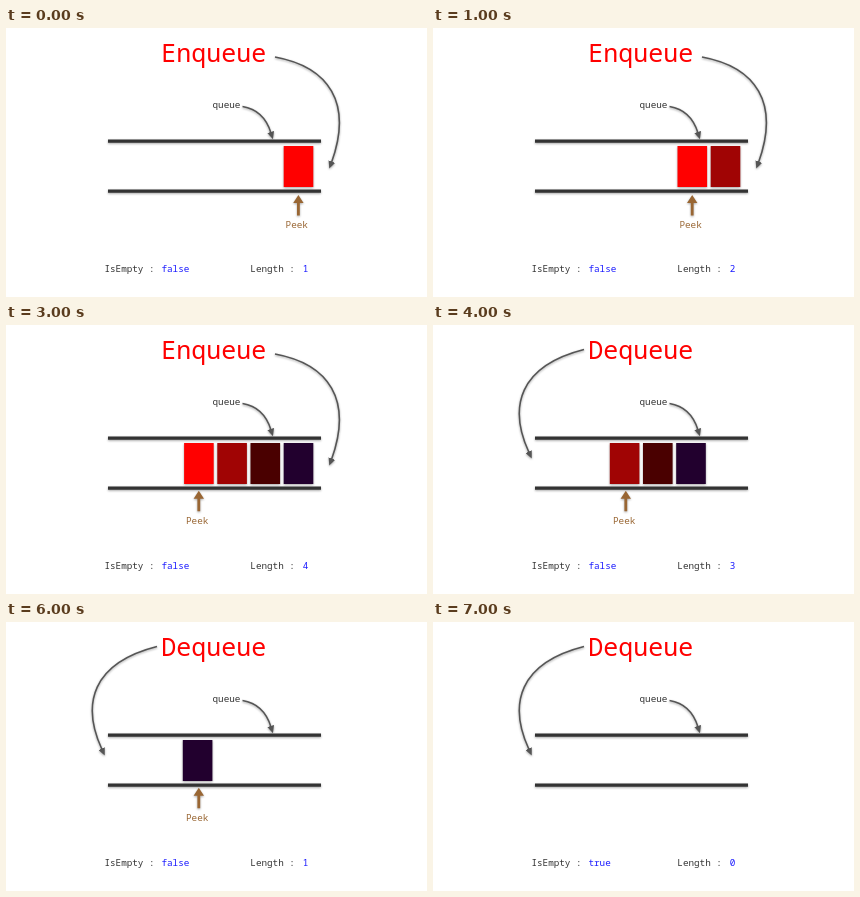
An HTML page that plays this animation: 421 by 269 pixels, repeating every 8000 ms.

```html
<!DOCTYPE html>
<html lang="en">
<head>
<meta charset="utf-8">
<title>Queue: enqueue and dequeue</title>
<style>
  html, body { margin: 0; width: 100%; height: 100%; overflow: hidden; background: #fff; }
  svg { display: block; width: 421px; height: 269px; }
  text { font: 9.3px "Noto Sans Mono", "DejaVu Sans Mono", monospace; fill: #333; white-space: pre; }
  #title { font-size: 25px; fill: #f00; }
  .value { fill: #1a1aff; }
  .rail { stroke: #333; stroke-width: 3.2; }
  .curve { fill: none; stroke: #555; stroke-width: 1.6; marker-end: url(#head); }
  .shadow { filter: drop-shadow(0 1.5px 1px rgba(0, 0, 0, .35)); }
  #peek, #peek text { fill: #996633; }
</style>
</head>
<body>
<svg viewBox="0 0 421 269">
  <defs>
    <marker id="head" markerUnits="userSpaceOnUse" markerWidth="8" markerHeight="7"
            refX="1" refY="3.5" orient="auto">
      <path d="M0 0L7.5 3.5L0 7Z" fill="#555"/>
    </marker>
  </defs>

  <text id="title" x="155.2" y="34.3"></text>
  <text x="206.5" y="79.8">queue</text>
  <g class="shadow">
    <path class="curve" d="M236.5 78.5C252 81 261 92 265 105"/>
    <path class="curve" id="enqueueArrow" d="M269 29C323 39 347 75 325.5 134.5"/>
    <path class="curve" id="dequeueArrow" d="M151 24.5C86 41 75 82 96 127.5"/>
  </g>

  <g id="blocks" class="shadow"></g>
  <g class="shadow">
    <path class="rail" d="M102 113.2H315M102 163.2H315"/>
  </g>

  <g id="peek">
    <path class="shadow" d="M0 167L5.2 175H1.4V187.5H-1.4V175H-5.2Z"/>
    <text x="-12.8" y="199.8">Peek</text>
  </g>

  <text x="98.4" y="243.6">IsEmpty :</text>
  <text id="isEmpty" class="value" x="155.4" y="243.6"></text>
  <text x="244.3" y="243.6">Length :</text>
  <text id="length" class="value" x="296.8" y="243.6"></text>
</svg>

<script>
const STEP = 1000, STEPS = 8, CAPACITY = 4, PITCH = 33.2;
const colors = ["#ff0000", "#a00404", "#4a0000", "#22002e"];
const el = id => document.getElementById(id);
const show = (node, visible) => node.setAttribute("visibility", visible ? "visible" : "hidden");

const blocks = colors.map(color => {
  const rect = document.createElementNS("http://www.w3.org/2000/svg", "rect");
  for (const [name, value] of Object.entries({ y: 118, width: 29.6, height: 41, fill: color }))
    rect.setAttribute(name, value);
  return el("blocks").appendChild(rect);
});

function render(step) {
  const adding = step < CAPACITY;
  const first = adding ? 0 : step - CAPACITY + 1;   // items already removed
  const added = adding ? step + 1 : CAPACITY;
  const count = added - first;
  // Enqueued items push in from the right; dequeued ones leave on the left.
  const left = adding ? 277.7 - (count - 1) * PITCH : 176.8;

  blocks.forEach((block, i) => {
    show(block, i >= first && i < added);
    block.setAttribute("x", left + (i - first) * PITCH);
  });

  const raised = step >= CAPACITY - 1;
  const peekX = adding ? 292.4 - (count - 1) * PITCH : 192.8;
  el("peek").setAttribute("transform", `translate(${peekX} ${raised ? -1.2 : 0})`);
  show(el("peek"), count > 0);

  show(el("enqueueArrow"), adding);
  show(el("dequeueArrow"), !adding);
  el("title").textContent = adding ? "Enqueue" : "Dequeue";
  el("isEmpty").textContent = count === 0;
  el("length").textContent = count;
}

let shown = -1;
const start = performance.now();
function frame() {
  const step = Math.floor((performance.now() - start) / STEP) % STEPS;
  if (step !== shown) render(shown = step);
  requestAnimationFrame(frame);
}
frame();
</script>
</body>
</html>
```
